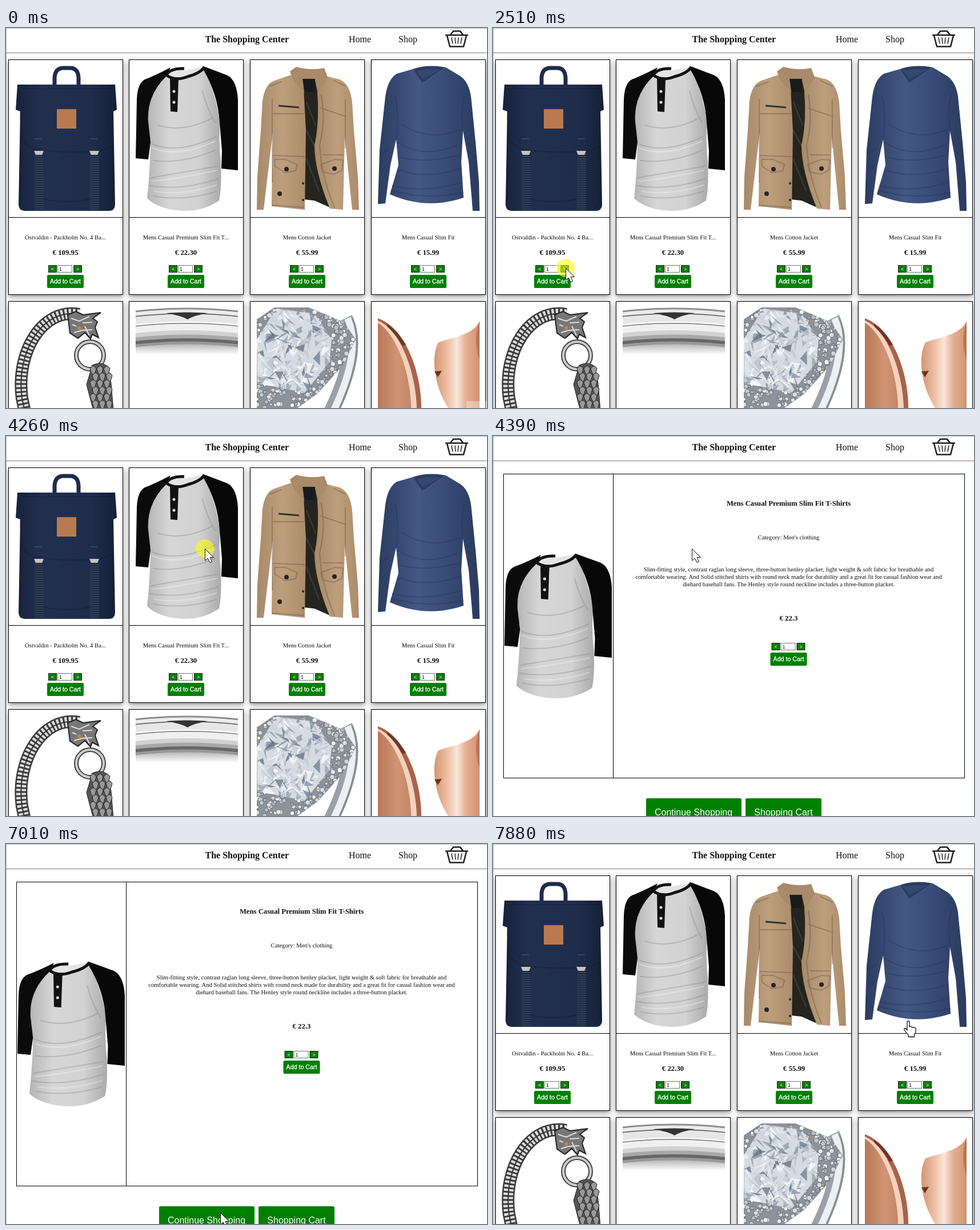
These frames come from a looping animation (842 px wide and 665 px high, 8000 ms). An HTML page:

```html
<!DOCTYPE html>
<html lang="en">
<head>
<meta charset="utf-8">
<title>The Shopping Center</title>
<style>
html, body { margin: 0; height: 100%; overflow: hidden; background: #fff; }
svg { display: block; }
text { font: 10.67px "Liberation Serif", "Times New Roman", serif; fill: #111; }
.mid { text-anchor: middle; }
.nav { font-size: 16px; }
.bold { font-weight: bold; font-size: 12.8px; }
.ui { font-family: "Liberation Sans", Arial, sans-serif; fill: #fff; }
.add { stroke: #fff; stroke-width: .3; }
.small { font-size: 8.9px; }
.big { font-size: 16px; }
.box { fill: #fff; stroke: #000; }
.shadow { filter: drop-shadow(0 3px 4px #0007); }
.line { fill: none; stroke: #000; }
.fold { fill: none; stroke-width: 2; stroke-linecap: round; opacity: .3; }
</style>
</head>
<body>
<svg width="842" height="665" viewBox="0 0 842 665">
<defs>
  <linearGradient id="navy"><stop stop-color="#17223b"/><stop offset=".25" stop-color="#22304f"/><stop offset=".75" stop-color="#1f2d4b"/><stop offset="1" stop-color="#152038"/></linearGradient>
  <linearGradient id="grey"><stop stop-color="#b5b5b5"/><stop offset=".3" stop-color="#d6d6d6"/><stop offset=".7" stop-color="#d2d2d2"/><stop offset="1" stop-color="#aaa"/></linearGradient>
  <linearGradient id="tan"><stop stop-color="#a68968"/><stop offset=".5" stop-color="#bd9f7e"/><stop offset="1" stop-color="#ab8c6b"/></linearGradient>
  <linearGradient id="blue"><stop stop-color="#2c3c60"/><stop offset=".4" stop-color="#435884"/><stop offset=".7" stop-color="#364a75"/><stop offset="1" stop-color="#2b3a5d"/></linearGradient>
  <linearGradient id="fade" x2="0" y2="1"><stop stop-color="#999"/><stop offset="1" stop-color="#fff"/></linearGradient>
  <linearGradient id="copper"><stop stop-color="#b97758"/><stop offset=".6" stop-color="#d09576"/><stop offset="1" stop-color="#c48565"/></linearGradient>
  <linearGradient id="rose"><stop stop-color="#d39674"/><stop offset=".3" stop-color="#eec0a4"/><stop offset=".5" stop-color="#fae6da"/><stop offset=".7" stop-color="#e5b094"/><stop offset="1" stop-color="#d0926f"/></linearGradient>
  <clipPath id="stone"><path d="M473 491L540 500L570 545L566 585L523 638L440 622L439 545Z"/></clipPath>
  <clipPath id="halo"><path d="M439 510L470 489H530L592 515L612 545L590 590L545 640L510 665H439Z"/></clipPath>

  <g id="henley">
    <path fill="#e4e4e4" d="M282 84Q290 72 314 74L346 68L345 86L300 94Z"/>
    <path fill="url(#grey)" d="M281 84Q296 94 318 87Q340 82 346 70Q366 110 375 165Q372 200 376 235Q378 280 373 302Q345 321 310 320Q268 318 247 298Q252 250 253 205L249 160Q246 116 281 84Z"/>
    <path fill="#0b0b0b" d="M288 69Q264 82 243 90Q230 97 229 125L227 228L249 230L253 200L249 163Q246 118 281 84Z"/>
    <path fill="#080808" d="M346 67L388 83Q404 92 406 125V249L377 246L378 215L374 165Q371 116 345 72Z"/>
    <path fill="none" stroke="#111" stroke-width="5" d="M280 82Q296 94 318 85Q341 79 347 68M281 82Q288 70 312 71"/>
    <path fill="#111" d="M287 87L302 88L300 147L288 146Z"/>
    <g fill="#ddd"><circle cx="294" cy="111" r="2.5"/><circle cx="294" cy="130" r="2.5"/></g>
    <path class="fold" stroke="#777" d="M256 203Q300 222 368 190M258 232Q310 238 366 214M254 262Q300 254 370 242M252 276Q310 285 371 264M258 294Q310 304 368 286M266 170Q310 184 360 158M344 110Q351 140 366 165"/>
    <path class="fold" stroke="#fff" d="M256 210Q300 228 366 198M256 268Q310 263 369 249M260 286Q310 294 368 275"/>
  </g>
</defs>

<g id="shop">
  <g id="cards"></g>

  <path fill="none" stroke="#1e2c49" stroke-width="7" d="M85 99V87Q86 71 99 70H114Q126 71 127 87V99"/>
  <path fill="url(#navy)" d="M20 99H191L194 143L188 146L191 310Q190 320 180 320H32Q22 319 22 309L25 146L17 143Z"/>
  <path class="fold" stroke="#0a1429" d="M25 147L27 196L48 212Q105 220 165 215L188 207M67 222L60 298Q104 310 153 298L147 222M28 106H186M25 212V304M187 212V304"/>
  <path class="fold" stroke="#6478a0" d="M50 194H62M148 194H160"/>
  <path stroke="#35425c" stroke-width="15" d="M58 220V320M155 220V320"/>
  <path stroke="#1b2740" stroke-width="15" stroke-dasharray="2 2" d="M58 222V320M155 222V320"/>
  <path fill="#c4c4c0" d="M49 215H66L63 222H52ZM146 215H163L160 222H149Z"/>
  <rect x="89" y="142" width="34" height="34" fill="#b97a50"/>

  <use href="#henley"/>

  <path fill="#25241f" d="M515 92H549L545 190L567 314L540 302L522 300Z"/>
  <path class="fold" stroke="#777" d="M526 130L542 170M526 180L542 210M526 230L548 285"/>
  <path fill="url(#tan)" d="M499 82L470 92Q453 98 449 128L446 180L440 260L439 318H451L459 250L467 182L465 312L523 318L525 180L521 105Z"/>
  <path fill="url(#tan)" d="M552 82L584 90Q602 97 606 130L609 180L616 260L618 318H606L599 250L593 190L590 318L567 316Q540 250 540 205Q549 165 545 112Z"/>
  <path fill="#a98a69" d="M497 76L508 68Q534 75 557 70L563 86L546 114L541 92L520 91L522 114L503 92Z"/>
  <path fill="#181b1d" d="M519 89H541V112H523Z"/>
  <path class="fold" stroke="#503b25" d="M468 150H521M551 140L595 155M466 223L522 225M556 222H590M470 230L490 230L510 239L507 250L488 253L471 242ZM551 239L575 230L590 231L588 249L574 256L554 252ZM466 310L521 314M462 102L482 94M574 92L594 102M466 125V270M594 125V210M552 118Q560 160 549 205Q552 260 575 314"/>
  <path stroke="#333" stroke-width="3" d="M477 136L513 139"/>
  <g fill="#29231f"><circle cx="491" cy="247" r="4"/><circle cx="575" cy="246" r="4"/><circle cx="479" cy="290" r="4"/><circle cx="520" cy="272" r="2"/><circle cx="520" cy="301" r="2"/></g>

  <path fill="url(#blue)" d="M712 72L684 80Q668 90 664 120L654 213L651 308L664 307L673 240L683 195L687 240L672 291Q735 319 801 297L797 235L800 180L810 235L817 320H829L828 270L822 200L814 120Q810 94 795 84L770 69L730 95Z"/>
  <path fill="#2b3d64" d="M712 72Q738 63 770 69L729 96Z"/>
  <path fill="#35496f" d="M718 75Q740 70 760 73L730 89Z"/>
  <path class="fold" stroke="#1d2d52" d="M683 195Q688 150 681 120M800 178Q796 145 802 117M686 200Q730 230 790 205M688 226Q735 238 794 222M686 248Q735 266 796 246M676 276Q735 290 797 270M674 284Q735 302 800 288M692 168Q740 200 794 178M657 220L672 211M656 250L668 240M810 216L821 226"/>

  <g fill="none">
    <path stroke="#3a3a3a" stroke-width="22" d="M128 501C65 489 17 565 28 648L37 690"/>
    <path stroke="#ddd" stroke-width="17" stroke-dasharray="4 3" d="M128 501C65 489 17 565 28 648L37 690"/>
    <path stroke="#333" stroke-width="2" d="M128 501C65 489 17 565 28 648L37 690"/>
  </g>
  <path fill="#777" stroke="#222" stroke-width="2" d="M108 502L122 496L135 502L166 498L152 508L160 514L156 524L162 542L151 536L148 544L138 533L126 543L112 534Z"/>
  <path fill="none" stroke="#ddd" stroke-width="2" d="M114 508L128 513L146 505M116 519L123 522M134 516L151 515M119 533L133 529L151 528M138 522L146 538"/>
  <circle cx="128" cy="525" r="3" fill="#c58a45"/>
  <circle cx="147" cy="573" r="24" fill="none" stroke="#444" stroke-width="8"/>
  <circle cx="147" cy="573" r="24" fill="none" stroke="#ccc" stroke-width="4"/>
  <path fill="#555" stroke="#222" d="M151 590Q166 583 178 592L184 622L188 670H153L141 624Z"/>
  <g id="scales" fill="#999" stroke="#222"></g>

  <path fill="url(#fade)" d="M227 552Q316 538 406 552V572H227Z"/>
  <g id="band" fill="none"></g>
  <path fill="#333" d="M280 499Q316 496 354 499Q328 503 318 510Q306 503 280 499Z"/>

  <g fill="none">
    <path stroke="#9aa0a8" stroke-width="26" d="M594 508Q622 565 567 675"/>
    <path stroke="#edf0f2" stroke-width="12" d="M598 508Q624 565 571 675"/>
    <path stroke="#878d95" stroke-width="3" d="M606 508Q632 565 580 675"/>
  </g>
  <g id="beads" clip-path="url(#halo)"></g>
  <g id="facets" clip-path="url(#stone)"></g>

  <path fill="#a8644a" d="M651 508C698 524 727 600 727 665H651Z"/>
  <path fill="#f3d2bf" d="M651 512C690 528 717 600 719 665H651Z"/>
  <path fill="url(#copper)" d="M651 516C682 534 708 600 709 665H651Z"/>
  <path fill="#6d3521" d="M667 518Q685 529 700 554L694 556Q683 536 667 522Z"/>
  <path fill="url(#rose)" d="M829 513C818 537 785 540 757 550Q748 568 750 594C754 630 764 648 774 665H829Z"/>
  <path fill="#b97555" d="M829 513Q817 546 829 582Z"/>
  <path fill="#653420" d="M750 601L763 600L756 611Z"/>
  <path id="tip" fill="#fff" opacity=".35" d="M806 653H842V665H806Z"/>
</g>

<g id="detail">
  <rect class="box" x="18.5" y="66.5" width="807" height="532"/>
  <path class="line" d="M210.5 66V599"/>
  <use href="#henley" transform="translate(-218.4 139) scale(1.05 1)"/>
  <g class="mid">
    <text class="bold" style="font-size:12.7px" x="517.5" y="122">Mens Casual Premium Slim Fit T-Shirts</text>
    <text x="517.5" y="181">Category: Men's clothing</text>
    <text x="517.5" y="237">Slim-fitting style, contrast raglan long sleeve, three-button henley placket, light weight &amp; soft fabric for breathable and</text>
    <text x="517.5" y="250">comfortable wearing. And Solid stitched shirts with round neck made for durability and a great fit for casual fashion wear and</text>
    <text x="517.5" y="263">diehard baseball fans. The Henley style round neckline includes a three-button placket.</text>
    <text class="bold" x="517.5" y="323">€ 22.3</text>
  </g>
  <g id="order"></g>
  <rect x="268" y="634" width="167" height="50" rx="2.5" fill="green"/>
  <rect x="442" y="634" width="133" height="50" rx="2.5" fill="green"/>
  <text class="ui big mid" x="351" y="664">Continue Shopping</text>
  <text class="ui big mid" x="508.5" y="664">Shopping Cart</text>
</g>

<path fill="#fff" d="M0 0H842V43H0Z"/>
<path class="line" style="stroke:#bbb" d="M0 .5H842M.5 0V665"/>
<path class="line" style="stroke:#777" d="M0 43.5H842"/>
<text class="nav" style="font-weight:bold" x="348.5" y="25">The Shopping Center</text>
<text class="nav" x="600" y="25">Home</text>
<text class="nav" x="687" y="25">Shop</text>
<g fill="none" stroke="#222" stroke-width="2.6" stroke-linejoin="round" stroke-linecap="round">
  <path d="M770 12.5H808M772 13L777 32.5H801L806 13M778 12L783 5.5H795L800 12"/>
  <path stroke-width="1.5" d="M780 17L782 27M786 17L787 27M792 17L791 27M798 17L796 27"/>
</g>

<g id="pointer">
  <circle id="glow" r="16" fill="#ff0" opacity=".58"/>
  <path id="arrow" fill="#fff" stroke="#111" d="M.5 .5V21L5.3 17L9 24.5L12.5 23L9 15.5H15.5Z"/>
  <path id="hand" fill="#fff" stroke="#111" stroke-width="1.3" stroke-linejoin="round" d="M-2 17V3Q-2 .7 0 .7T2 3V11Q3 9.500 5 10.500Q6 11 6 12Q8 10.500 9.500 12.500Q11 11.500 12.500 13Q13.500 14 13.200 17Q13 22 10.500 25V28.500H0V25Q-4 21 -7 16.500Q-8 14 -5.500 13.500Q-4 13.500 -2 17Z"/>
</g>
</svg>

<script>
const el = id => document.getElementById(id);
const FRAME = 125, LOOP = 8000;

function stepper(dx, dy, id) {
  const button = (x, sign) => `<rect x="${x}" y="415.5" width="14" height="12" fill="green" stroke="#222"/>
    <text class="ui small mid" x="${x + 7}" y="425">${sign}</text>`;
  return `<g transform="translate(${dx} ${dy})">
    ${button(74.5, "&lt;")}${button(118.5, "&gt;")}
    <rect x="90.5" y="415.5" width="25" height="12" fill="#fff" stroke="#777"/>
    <text class="ui small" style="fill:#111" x="93" y="425" id="${id}">1</text>
    <rect x="72" y="432" width="64" height="23" rx="2.5" fill="green"/>
    <text class="ui add mid" x="104" y="447">Add to Cart</text></g>`;
}

const goods = [
  ["Ostvaldin - Packholm No. 4 Ba...", "109.95"],
  ["Mens Casual Premium Slim Fit T...", "22.30"],
  ["Mens Cotton Jacket", "55.99"],
  ["Mens Casual Slim Fit", "15.99"]
];
const left = [4.5, 215.5, 427.5, 639.5];
const frame = (x, y) => `<rect class="box shadow" x="${x}" y="${y}" width="200" height="411"/>`;
el("cards").innerHTML = goods.map(([name, price], i) => {
  const x = left[i], mid = x + 99.5;
  return frame(x, 55.5) + frame(x, 478.5) + `<path class="line" d="M${x} 331.5h200"/>
    <text class="mid" x="${mid}" y="370">${name}</text>
    <text class="mid bold" x="${mid}" y="397">€ ${price}</text>` + stepper(x - 4.5, 0, "count" + i);
}).join("");
el("order").innerHTML = stepper(413.5, -53, "amount");

// Jewellery texture
let seed = 7;
const rnd = (a, b) => a + (b - a) * ((seed = seed * 16807 % 2147483647) / 2147483647);
const many = (n, make) => Array.from({ length: n }, (_, i) => make(i)).join("");
el("beads").innerHTML = `<path fill="#8d939b" d="M439 489H618V665H439Z"/>` + many(600, () =>
  `<circle cx="${rnd(439, 612)}" cy="${rnd(489, 665)}" r="${rnd(2, 4.5)}" fill="hsl(210 8% ${rnd(62, 97)}%)" stroke="#596069" stroke-width=".8"/>`);
el("facets").innerHTML = `<path fill="#d4dbe2" d="M439 489H575V640H439Z"/>` + many(260, () => {
  const x = rnd(439, 570), y = rnd(491, 638), d = () => rnd(-18, 18);
  return `<path d="M${x} ${y}l${d()} ${d()}l${d()} ${d()}Z" fill="hsl(212 14% ${rnd(40, 110)}%)" opacity=".75"/>`;
});
el("scales").innerHTML = many(18, i => {
  const row = i / 3 | 0, x = 147 + i % 3 * 12 + row % 2 * 4, y = 596 + row * 12;
  return `<path d="M${x} ${y}q6 -9 11 0q-2 9 -5 12q-5 -5 -6 -12Z"/>`;
});

// Polished ring: height, thickness, lightness of each arc
el("band").innerHTML = [
  [491, 3, 55], [496, 6, 92], [500, 2, 30], [507, 13, 90], [517, 2, 45],
  [524, 13, 94], [533, 8, 82], [540, 7, 66], [546, 6, 40], [551, 5, 60]
].map(([y, w, l]) => `<path stroke="hsl(0 0% ${l}%)" stroke-width="${w}" d="M227 ${y + 5}Q316 ${y - 5} 406 ${y + 5}"/>`).join("");

// Pointer stops: step, x, y
const stops = [
  [3, 524, 690], [4, 522, 650], [10, 120, 222], [11, 120, 228], [17, 127, 420], [20, 127, 420],
  [22, 125, 441], [24, 125, 441], [31, 391, 262], [33, 348, 197], [36, 348, 197], [43, 538, 370],
  [45, 538, 370], [46, 525, 385], [50, 525, 385], [55, 375, 645], [57, 375, 645],
  [61, 630, 194], [63, 727, 309]
];
const clicks = [19, 20, 22, 23, 33, 34, 44, 45, 48];

function place(n) {
  const k = stops.findIndex(s => s[0] >= n);
  if (k < 1) return stops[0].slice(1);
  const [a, ax, ay] = stops[k - 1], [b, bx, by] = stops[k];
  const u = (n - a) / (b - a), e = u * u * (3 - 2 * u);
  return [ax + (bx - ax) * e, ay + (by - ay) * e];
}

const show = (id, on) => el(id).style.display = on ? "" : "none";

function draw(now) {
  const n = Math.max(0, Math.floor((now % LOOP - 5) / FRAME));
  const [x, y] = place(n);
  const detail = n >= 35 && n < 57, click = clicks.includes(n);
  const onPicture = left.some(l => x > l + 11 && x < l + 190) && (y > 66 && y < 322 || y > 489);
  const hand = !detail && !click && onPicture;
  show("shop", !detail);
  show("detail", detail);
  show("tip", n < 1);
  show("glow", click);
  show("hand", hand);
  show("arrow", !hand);
  el("count0").textContent = n === 21 || n === 22 ? 2 : 1;
  el("amount").textContent = n >= 45 && n < 49 ? 2 : 1;
  el("pointer").setAttribute("transform", `translate(${x} ${y})`);
}

const start = performance.now();
function tick() {
  draw(performance.now() - start);
  requestAnimationFrame(tick);
}
tick();
</script>
</body>
</html>
```
